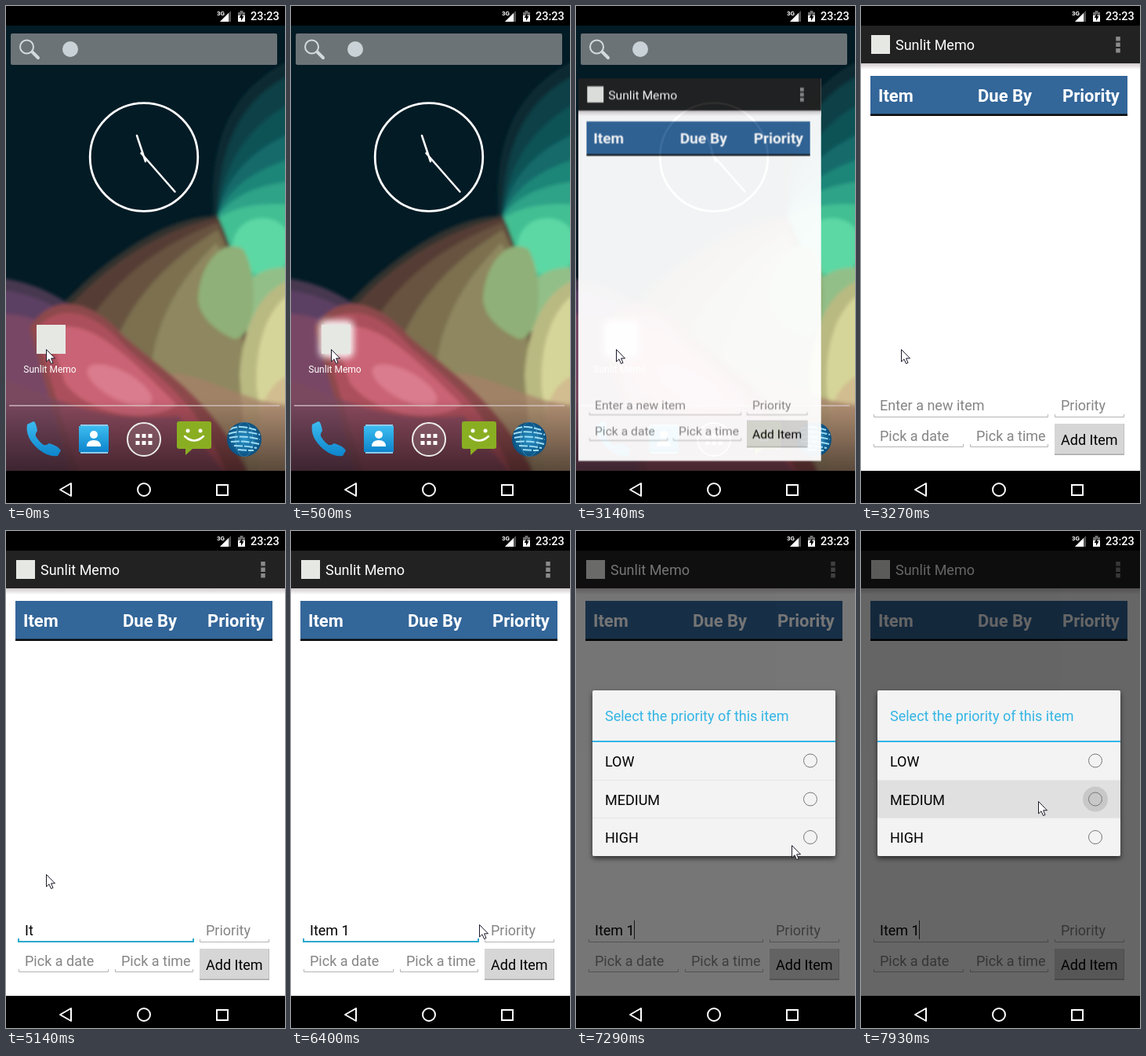
These frames come from a looping animation (356 px wide and 633 px high, 8 s). An HTML page without scripts:

```html
<!DOCTYPE html>
<html lang="en">
<head>
<meta charset="utf-8">
<title>Task list</title>
<style>
html, body { margin: 0; width: 100%; height: 100%; overflow: hidden; background: #000; }
svg { display: block; width: 100vw; height: 100vh; }
text { font-family: Roboto, "Noto Sans", sans-serif; font-size: 18px; white-space: pre; }
.head { font-size: 22px; font-weight: 700; fill: #fff; }
.hint { fill: #858585; }
.line { fill: none; stroke: #b4b4b4; }
.a { animation: 8s step-end infinite; }

#glow { animation-name: glow; }
@keyframes glow { 0% { opacity: 0 } 6.25%, 100% { opacity: .9 } }

#app { animation-name: open; }
@keyframes open {
  0% { opacity: 0; transform: none }
  37.75% { opacity: .7; transform: translate(9px, 261px) scale(.508, .473) translate(0, -25px) }
  39.25% { opacity: .95; transform: translate(3px, 92px) scale(.87, .86) translate(0, -25px) }
  40.875%, 100% { opacity: 1; transform: none }
}
#body { animation-name: body; }
@keyframes body { 0% { opacity: .48 } 39.25%, 100% { opacity: 1 } }

#prompt { animation-name: prompt; }
@keyframes prompt { 0% { opacity: 1 } 52.625%, 100% { opacity: 0 } }
#typed { animation-name: typed; }
@keyframes typed { 0% { opacity: 0 } 52.625%, 100% { opacity: 1 } }
#cover { animation-name: type; }
@keyframes type {
  0% { transform: translateX(5px) }
  55.75% { transform: translateX(11px) }
  66.25% { transform: translateX(20.5px) }
  68% { transform: translateX(36.5px) }
  73.375%, 100% { transform: translateX(55px) }
}
#typo { animation-name: typo; }
@keyframes typo { 0%, 64.25%, 100% { opacity: 0 } 55.75% { opacity: 1 } }
#caret { animation-name: caret; }
@keyframes caret {
  0% { opacity: 0; transform: none }
  66.25% { opacity: 1; transform: none }
  68% { opacity: 0; transform: none }
  71.625% { opacity: 1; transform: translateX(20px) }
  73.375% { opacity: 1; transform: translateX(30px) }
  80% { opacity: 0; transform: translateX(30px) }
  85.5%, 100% { opacity: 1; transform: translateX(30px) }
}
#focus { animation-name: focus; }
@keyframes focus { 0%, 87.5%, 100% { opacity: 0 } 42.375% { opacity: 1 } }

#dim { animation-name: dim; }
@keyframes dim {
  0% { opacity: 0 } 87.5% { opacity: .04 } 89.25% { opacity: .35 }
  91.125% { opacity: .54 } 92.75%, 100% { opacity: .6 }
}
#dialog { animation-name: dialog; }
@keyframes dialog { 0% { opacity: 0 } 87.5% { opacity: .4 } 89.25%, 100% { opacity: 1 } }
#press { animation-name: press; }
@keyframes press { 0% { opacity: 0 } 99.125%, 100% { opacity: 1 } }

#mouse { animation-name: mouse; }
@keyframes mouse {
  0% { transform: translate(51px, 437px) }
  76.875% { transform: translate(115px, 458px) }
  78.375% { transform: translate(190px, 485px) }
  80% { transform: translate(240px, 501px) }
  81.75% { transform: translate(271px, 510px) }
  87.5% { transform: translate(290px, 490px) }
  89.25% { transform: translate(304px, 463px) }
  91.125% { transform: translate(275px, 400px) }
  92.75% { transform: translate(248px, 354px) }
  94.5% { transform: translate(233px, 339px) }
  96%, 100% { transform: translate(226px, 344px) }
}
</style>
</head>
<body>
<svg viewBox="0 0 356 633" preserveAspectRatio="none">
<defs>
  <filter id="soft" x="-50%" y="-50%" width="200%" height="200%"><feGaussianBlur stdDeviation="4"/></filter>
  <filter id="haze" x="-5%" y="-5%" width="110%" height="110%"><feGaussianBlur stdDeviation="2"/></filter>
  <filter id="shade" x="-10%" y="-10%" width="120%" height="125%"><feDropShadow dx="0" dy="3" stdDeviation="3" flood-opacity=".6"/></filter>
  <linearGradient id="barShade" x2="0" y2="1"><stop stop-color="#cfc8cc"/><stop offset="1" stop-color="#fff"/></linearGradient>
  <linearGradient id="dusk" x2="0" y2="1"><stop stop-opacity="0"/><stop offset="1" stop-opacity=".5"/></linearGradient>
  <linearGradient id="sky" x2="0" y2="1"><stop stop-color="#3cbcf0"/><stop offset="1" stop-color="#0d84cc"/></linearGradient>
  <radialGradient id="ball"><stop stop-color="#2a94c8"/><stop offset="1" stop-color="#0a4f80"/></radialGradient>
  <clipPath id="screen"><path d="M0 25H356V592H0z"/></clipPath>
  <clipPath id="disc"><circle cx="304" cy="552" r="22"/></clipPath>
  <circle id="radio" r="8.5" fill="none" stroke="#777"/>
</defs>

<!-- Home screen -->
<g clip-path="url(#screen)">
  <path d="M0 25H356V592H0z" fill="#021b25"/>
  <g filter="url(#haze)">
    <path d="M380 60C300 95 258 150 264 268L300 420H380z" fill="#082a33"/>
    <path d="M380 80C315 105 272 155 269 268L300 420H380z" fill="#093f47"/>
    <path d="M380 115C315 145 276 195 270 268L300 420H380z" fill="#0c5357"/>
    <path d="M380 155C315 180 280 215 270 268L300 420H380z" fill="#136b6a"/>
    <path d="M380 190C320 205 285 230 270 268L300 420H380z" fill="#1d8678"/>
    <path d="M380 222C325 225 290 240 270 268L300 420H380z" fill="#2ea388"/>
    <path d="M380 255C330 248 290 255 270 272L295 420H380z" fill="#43bf93"/>
    <ellipse cx="327" cy="306" rx="38" ry="36" fill="#5bd8a4"/>
    <path d="M380 335C325 325 295 350 285 400L295 620H380z" fill="#92bf88"/>
    <path d="M-20 420C60 400 75 375 100 352C150 308 210 268 270 267C288 305 304 360 308 430L320 620H-20z" fill="#33302f"/>
    <path d="M50 420C110 340 190 285 270 270C290 315 306 370 308 430L320 620H60z" fill="#543d35"/>
    <path d="M90 430C130 350 200 302 270 276C292 320 306 380 309 450L320 620H100z" fill="#68533f"/>
    <path d="M135 440C160 370 210 322 270 285C292 325 308 400 312 620H170z" fill="#7b704f"/>
    <path d="M185 460C192 400 220 350 268 302C290 335 308 400 312 620H220z" fill="#8e875e"/>
    <path d="M245 372C248 325 278 295 303 310C325 350 318 425 290 424C265 412 246 395 245 372z" fill="#8fb078"/>
    <path d="M380 345C330 350 302 400 298 470L310 620H380z" fill="#b9b982"/>
    <path d="M380 358C338 370 316 425 320 490L340 620H380z" fill="#d6d599"/>
    <path d="M380 465C340 470 325 500 322 540V620H380z" fill="#d2bd90"/>
    <path d="M190 470C240 455 300 510 380 510V620H190z" fill="#a8806a" opacity=".7"/>
    <path d="M-20 345C40 350 80 375 110 405L150 620H-20z" fill="#46374f"/>
    <path d="M-20 360C40 365 75 388 95 405L150 620H-20z" fill="#5b4064"/>
    <path d="M-20 392C30 390 60 405 75 430L130 620H-20z" fill="#784765"/>
    <path d="M30 410C60 362 110 375 150 420C200 465 275 505 320 620H90z" fill="#8c4a4c"/>
    <path d="M38 412C65 378 110 385 150 432C200 478 255 510 290 620H100z" fill="#ac505b"/>
    <path d="M55 415C100 390 150 440 218 508C180 535 105 520 75 480z" fill="#ca6475"/>
    <ellipse cx="145" cy="483" rx="46" ry="18" transform="rotate(28 145 483)" fill="#da7c8d"/>
    <path d="M-20 470C50 490 110 535 220 522L300 620H-20z" fill="#7c4a60" opacity=".65"/>
  </g>
  <path d="M0 500H356V592H0z" fill="url(#dusk)"/>
</g>
<rect x="6" y="35" width="340" height="40" rx="2" fill="#6b7376"/>
<g fill="none" stroke="#d3dadd" stroke-linecap="round">
  <circle cx="26.500" cy="52" r="8.500" stroke-width="2"/>
  <path d="M34 59l7 7" stroke-width="4"/>
</g>
<circle cx="82" cy="55" r="10" fill="#c9d2d6"/>
<g fill="none" stroke="#fff" stroke-linecap="round">
  <circle cx="176" cy="192.500" r="68.800" stroke-width="2.800"/>
  <path d="M172.500 187.500L215.500 236.500M178 198L167 165" stroke-width="2.500"/>
</g>
<rect id="glow" class="a" x="36" y="400" width="44" height="48" rx="8" fill="#fff" filter="url(#soft)"/>
<rect x="39" y="406" width="37" height="37" fill="#e6e8e3"/>
<text x="56" y="467" text-anchor="middle" fill="#fff" style="font-size:12px">Sunlit Memo</text>
<path d="M4 509H349" stroke="#d8c8c8" stroke-width="1.500" opacity=".85"/>
<path d="M27 533L35 529Q38 529 40 541Q37 545 38 548Q43 556 48 559Q51 560 55 557Q66 560 70 566L66 573Q55 575 42 565Q24 550 27 533z" fill="url(#sky)"/>
<rect x="95" y="533" width="35" height="37" fill="#8fcbea"/>
<rect x="93" y="535" width="38" height="33" fill="url(#sky)"/>
<path d="M103 561Q103 553 112 553Q121 553 121 561z" fill="#fff"/>
<circle cx="112" cy="546" r="5" fill="#fff"/>
<circle cx="176" cy="552" r="21" fill="#fff" fill-opacity=".12" stroke="#eee" stroke-width="2"/>
<path d="M165.500 547.500h21M165.500 556.500h21" stroke="#fff" stroke-width="5" stroke-dasharray="5 3"/>
<path d="M221 529H259Q262 529 262 532V561Q262 564 259 564H238L229 572V564H221Q218 564 218 561V532Q218 529 221 529z" fill="#8aae22"/>
<circle cx="232" cy="541" r="2.500" fill="#fff"/><circle cx="248" cy="541" r="2.500" fill="#fff"/>
<path d="M228 548Q240 559 252 548" fill="none" stroke="#fff" stroke-width="2.500" stroke-linecap="round"/>
<circle cx="304" cy="552" r="22" fill="url(#ball)"/>
<g clip-path="url(#disc)" fill="none" stroke="#9ddcf4">
  <path d="M285 540q10-8 34 0M284 545q14-6 40 1M285 550q16-4 39 2M287 555q16-2 36 3M291 560q14 0 29 3M296 565q10 1 20 1" stroke-width="2" stroke-dasharray="11 2"/>
  <ellipse cx="304" cy="552" rx="11" ry="22" opacity=".3"/>
</g>

<!-- App window -->
<g id="app" class="a">
  <path d="M0 25H356V592H0z" fill="#fff"/>
  <path d="M0 73H356V81H0z" fill="url(#barShade)"/>
  <path d="M0 25H356V73H0z" fill="#222"/>
  <rect x="13" y="37" width="24" height="24" fill="#e6e8e3"/>
  <text x="44" y="56" fill="#fff">Sunlit Memo</text>
  <path d="M328 39v20.500" stroke="#8a8a8a" stroke-width="5.500" stroke-dasharray="5.500 2"/>
  <g id="body" class="a">
    <path d="M12 89H340V138H12z" fill="#336699"/>
    <path d="M12 137.500H340V140H12z" fill="#0a0a0a"/>
    <text class="head" x="22" y="122">Item</text>
    <text class="head" x="149" y="122">Due By</text>
    <text class="head" x="257" y="122">Priority</text>
    <path class="line" d="M16.500 520v3.500H238.500v-3.500M247.500 520v3.500H335.500v-3.500M16.500 558v3.500H130.500v-3.500M139.500 558v3.500H238.500v-3.500"/>
    <path id="focus" class="a" d="M16 519v4H239v-4" fill="none" stroke="#2ba8cc" stroke-width="2"/>
    <text id="prompt" class="hint a" x="24" y="515">Enter a new item</text>
    <g id="typed" class="a">
      <text x="24" y="515">Item 1</text>
      <rect id="cover" class="a" x="24" y="496" width="60" height="22" fill="#fff"/>
      <text id="typo" class="a" x="35" y="515">r</text>
    </g>
    <path id="caret" class="a" d="M44.500 496V520" stroke="#333"/>
    <text class="hint" x="255" y="515">Priority</text>
    <text class="hint" x="24" y="553.500">Pick a date</text>
    <text class="hint" x="147" y="553.500">Pick a time</text>
    <path d="M247 532H336V572H247z" fill="#a9a9a9"/>
    <path d="M247 532H335.500V570.500H247z" fill="#d6d6d6"/>
    <text x="255" y="559">Add Item</text>
  </g>
</g>

<path id="dim" class="a" d="M0 25H356V592H0z"/>
<g id="dialog" class="a">
  <rect x="21" y="203" width="310" height="211" rx="2" fill="#f3f3f3" filter="url(#shade)"/>
  <g id="press" class="a">
    <path d="M21 318H331V365H21z" fill="#e0e0e0"/>
    <circle cx="299" cy="341.500" r="16" fill="#c8c8c8"/>
  </g>
  <path d="M21 317.500H331M21 365.500H331" stroke="#e6e6e6"/>
  <path d="M21 268H331" stroke="#33b5e5" stroke-width="2"/>
  <text x="37" y="242" fill="#33b5e5">Select the priority of this item</text>
  <text x="37" y="300">LOW</text><text x="37" y="348.500">MEDIUM</text><text x="37" y="397">HIGH</text>
  <use href="#radio" x="299" y="292.500"/><use href="#radio" x="299" y="341.500"/><use href="#radio" x="299" y="390"/>
</g>

<!-- System bars -->
<path d="M0 0H356V25H0zM0 592H356V633H0z"/>
<text x="269" y="12" fill="#fff" style="font-size:8px;font-weight:700">3G</text>
<path d="M273 20H287V6z" fill="#555"/>
<path d="M273 20H284V9z" fill="#fff"/>
<path d="M296 8h2.500V6h4v2H305V20H296z" fill="#707070"/>
<path d="M296 12H305V20H296z" fill="#fff"/>
<path d="M301.500 9L297.500 15H300V19L303.500 13H301.500z" fill="#000"/>
<text x="312" y="18" fill="#fff" style="font-size:14.5px;font-weight:500">23:23</text>
<g fill="none" stroke="#fff" stroke-width="2">
  <path d="M69 616L83 608V624z" stroke-linejoin="round"/>
  <circle cx="176" cy="616" r="8"/>
  <path d="M269 610H283V623H269z"/>
</g>

<path id="mouse" class="a" d="M.5.500V16L4 12.800 6.500 18.500 9 17.500 6.600 11.800H11.500z" fill="#fff" stroke="#1a1a2a"/>
</svg>
</body>
</html>
```
